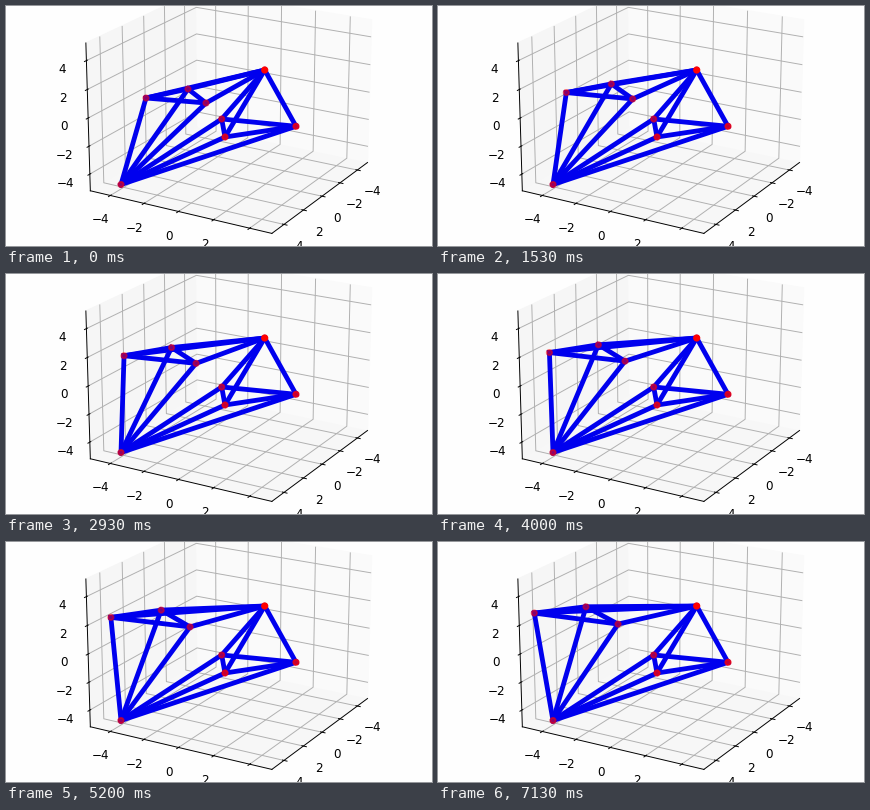
Write a matplotlib script that moves like this. It is 426 px wide and 240 px high and loops after 7.19 s.

```python
import numpy as np
import matplotlib.pyplot as plt
from matplotlib.animation import FuncAnimation
from matplotlib.collections import LineCollection
from matplotlib.colors import to_rgba

W, H = 426, 240
DPI = 86.5
LOOP_MS = 7190
FRAMES = 108

# Hinge ends, then the triangle of the resting half (stage pixels).
HINGE = [(115, 178.5), (258.7, 64)]
RESTING = [(215.7, 113), (219, 131), (290, 120.3)]

# Swinging triangle: position, velocity and acceleration term per vertex.
START = np.array([(140, 92), (182, 83), (200, 97)])
VELOCITY = np.array([(-8.45, -3.9), (-6.2, -3.7), (-3.8, -2.95)])
BEND = np.array([(0.325, 0.135), (0.2, 0.16), (0.14, 0.12)])

# Each half: a triangle with every corner tied to both hinge ends.
EDGES = []
for a, b, c in [(2, 3, 4), (5, 6, 7)]:
    EDGES += [(a, b), (b, c), (c, a)]
    EDGES += [(end, v) for end in (0, 1) for v in (a, b, c)]

# Nearer joints are more opaque.
SHADE = [0.58, 1.0, 0.58, 0.75, 0.75, 0.5, 0.5, 0.52]


def joints(t):
    swing = START + VELOCITY * t + BEND * t**2
    return np.vstack([HINGE, RESTING, swing])


fig = plt.figure(figsize=((W + 0.001) / DPI, (H + 0.001) / DPI), dpi=DPI,
                 facecolor="#fefefe")

# The 3D box is larger than the stage, so its lower end is cut off.
side, left, bottom = 320, 61.4, -23.2
box = fig.add_axes([left / W, bottom / H, side / W, side / H], projection="3d",
                   facecolor="none")
box.view_init(elev=20, azim=30)
limit = 5 * 25 / 24
ticks = range(-4, 5, 2)
box.set(xlim=(-limit, limit), ylim=(-limit, limit), zlim=(-limit, limit),
        xticks=ticks, yticks=ticks, zticks=ticks)
for axis, grey in [(box.xaxis, 0.98), (box.yaxis, 0.965), (box.zaxis, 0.97)]:
    axis.set_pane_color((grey, grey, grey, 1))

stage = fig.add_axes([0, 0, 1, 1], zorder=5)
stage.set(xlim=(0, W), ylim=(H, 0))
stage.axis("off")

points = joints(0)
bars = LineCollection(points[EDGES], colors="#0000ee", linewidths=4,
                      capstyle="projecting", zorder=2)
stage.add_collection(bars)
dots = stage.scatter(*points.T, s=20, linewidths=1.5, zorder=3,
                     c=[to_rgba("red", alpha) for alpha in SHADE])


def update(i):
    points = joints(i * LOOP_MS / FRAMES / 1000)
    bars.set_segments(points[EDGES])
    dots.set_offsets(points)
    return bars, dots


anim = FuncAnimation(fig, update, frames=FRAMES, interval=LOOP_MS / FRAMES,
                     repeat=True, repeat_delay=0)
plt.show()
```
